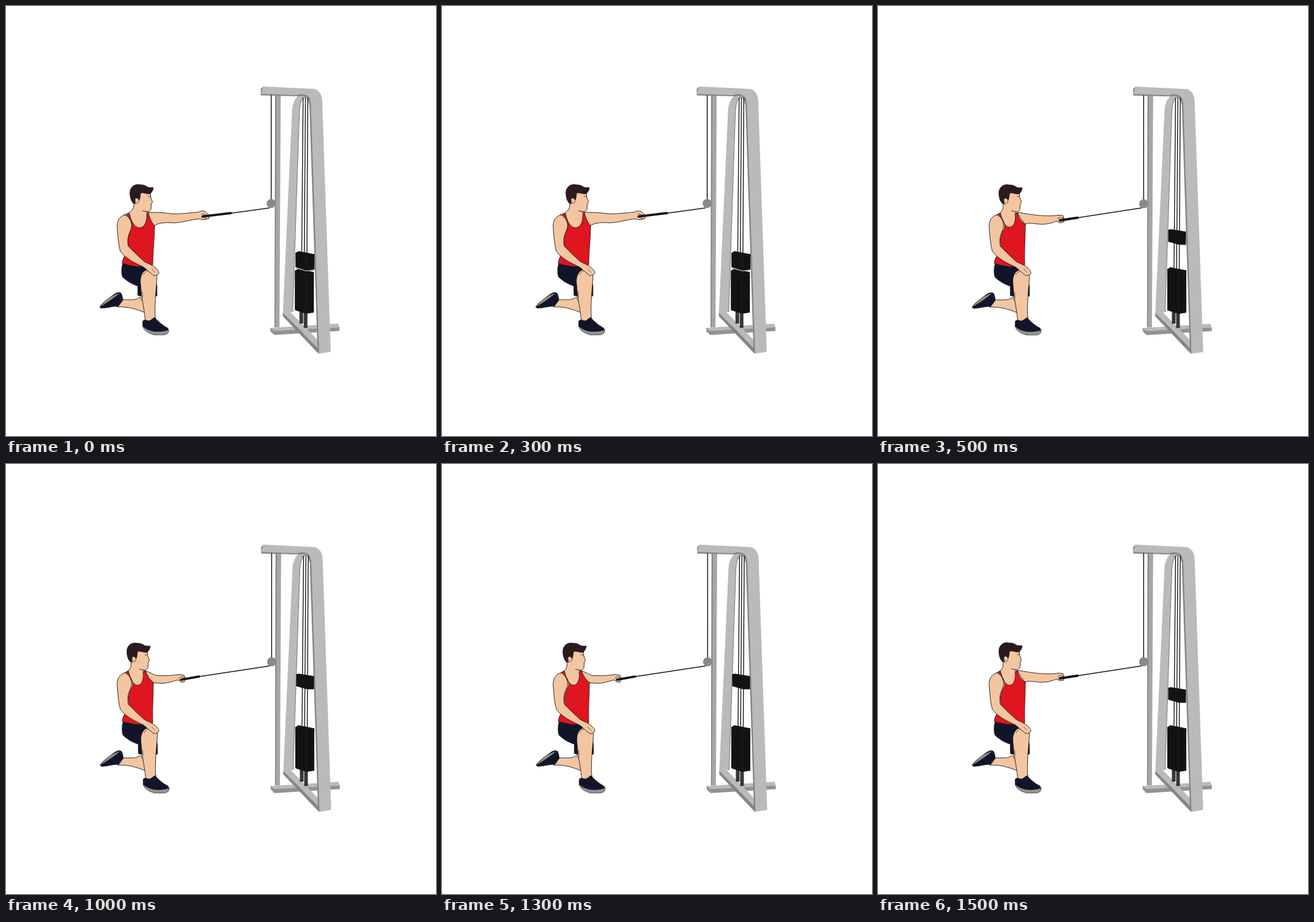
Animation of 700x700 px, one loop 2000 ms. Source, as an HTML page with a canvas:

```html
<!DOCTYPE html>
<html lang="en">
<head>
<meta charset="utf-8">
<title>Half-kneeling cable press</title>
<style>
  html, body { margin: 0; width: 100%; height: 100%; overflow: hidden; background: #fff; }
  canvas { display: block; width: 700px; height: 700px; }
</style>
</head>
<body>
<canvas id="stage" width="700" height="700"></canvas>
<script>
const ctx = document.getElementById('stage').getContext('2d');
const STEP = 500;
const SKIN = '#f3c6a1', NAVY = '#11152a', HAIR = '#2b1a1e', RED = '#df1520', INK = '#1c1717';
const LIGHT = '#bababa', MID = '#a6a6a6', DARK = '#858585', BLACK = '#131313';

function shape(d, fill, line, width = 0.9) {
  const path = new Path2D(d);
  if (fill) { ctx.fillStyle = fill; ctx.fill(path); }
  if (line) { ctx.strokeStyle = line; ctx.lineWidth = width; ctx.stroke(path); }
}
const stroke = (d, width = 1.2, color = INK) => shape(d, null, color, width);

function shifted(x, y, draw) {
  ctx.save();
  ctx.translate(x, y);
  draw();
  ctx.restore();
}

const extended = {
  machine: [-0.3, -0.1], head: [0, 0], plate: null,
  chest: 'M208 320C209 331 204 336 192 340L200 367L238 366L242 358C238 347 234 339 232 336C227 336 226 335 226 331Z',
  tank: 'M196 340L201 337.500C203 349 209 361 217 361C226 361 230 350 229 338L232 336C233 346 238 353 242 358C242 375 239 400 239 421C222 427 205 424 189 419C190 409 199 398 199 389C197 378 200 371 203 365C207 357 205 347 196 340Z',
  arm: 'M231 336C244 336 258 336 272 338.500C288 338 301 337 313 335.500C318 333 323 333 326 336L331 341L330.500 346L322 348L314 346.500C300 348 286 353 272 353C258 352 248 353 241 358C237 353 234 346 231 336Z',
  hand: 'M318 338L325 340L331 341M320 344L327 346',
  grip: [320, 342.6, 367, 337.2]
};
const bent = {
  machine: [0.4, 0.2], head: [-5, 0.2], plate: 363,
  chest: 'M203 321C205 331 202 336 193 340L201 367L236 365L240 356C237 347 231 340 228 337C222 336 221 335 221 331Z',
  tank: 'M195 339L199.500 337C202 349 207 360 214 360C221 360 225 350 223 338L227 337C229 346 234 353 240 355C240 374 238 399 239 421C222 427 205 424 189 419C190 409 200 398 200 389C198 378 201 370 205 364C209 357 204 346 195 339Z',
  arm: 'M227 336C237 337 244 339 258 340.500C272 342 285 342 293 340.500L301 341L303 347L302 352L296 353L291 350C282 354 272 356 262 355C252 354 244 353 239 355C236 350 230 344 227 336Z',
  hand: 'M292 346L297 344L303 346',
  grip: [296, 349, 326, 344.6]
};
const pulled = {
  ...bent, head: [-5, 0.8], plate: 341,
  arm: 'M227 337C236 339 240 344 247 344.500C261 345 274 344 283 342.500L290 344L291.500 349L290 355L285 355L280 351.500C270 354 260 358 250 357C246 356 242 356 239 357C236 352 230 345 227 337Z',
  hand: 'M281 349L286 346L291 348',
  grip: [285, 351.2, 315, 346]
};
const poses = [extended, bent, pulled, bent];

function drawFrame() {
  // base
  shape('M430 524L541 517L543 523L437 530Z', LIGHT);
  shape('M430 524L437 529L543 523V529L437 535.500L431 530Z', '#929292');
  shape('M451 499L462 497L510 546V559Z', LIGHT);
  shape('M451 499L509 558V566L451 505Z', DARK);
  // column
  shape('M438.500 144H447.500L445.500 523H437.500Z', MID);
  shape('M438.500 144H440.500L439 523H437.500Z', DARK);
  // far leg and arch
  shape('M451 500L466 170C467 154 474 144 485 143C493 143 497 149 498 158L493 160C491 151 489 149 487 149C481 150 479 158 478 170L467 498Z', LIGHT);
  stroke('M467 498L478 170C479 157 482 149 488 148.500', 1.2, DARK);
  // top beam and near leg
  shape('M419 131L502 135C508 136 514 142 515 152L529 563L509 566L496 155C495 149 490 145 483 145L415 144Z', LIGHT);
  shape('M419 131L415 144L415 135Z', DARK);
  shape('M415 143L474 145C482 142 492 143 496 153L494 157C491 148 487 145 477 147L415 145.500Z', DARK);
  shape('M494 155L496.500 156L510 566L507.500 562Z', DARK);
}

function drawCables(to) {
  for (const [top, bottom] of [[484, 481.5], [487.8, 485.7], [491.6, 490]]) {
    const end = top + (bottom - top) * (to - 149) / 280;
    stroke(`M${top} 149L${end} ${to}`, 1.4);
  }
}

function slab(x, y, h) {
  shape(`M${x} ${y + 3}L${x + 5} ${y}L${x + 31} ${y + 5}V${y + h - 2}L${x + 18} ${y + h}L${x} ${y + h - 6}Z`, BLACK);
  stroke(`M${x + 18} ${y + 6}V${y + h}`, 0.7, '#2b2b2b');
}

function drawStack(plate) {
  shape('M478 494H484V517H478ZM485 498H491V524H485Z', '#363636');
  drawCables(plate ? 428 : 402);
  if (plate) {
    slab(470.5, 425, 76);
    shape(`M472 ${plate + 1}L476 ${plate}L501 ${plate + 4}V${plate + 25.5}L490 ${plate + 25.5}L472 ${plate + 20.5}Z`, BLACK);
  } else {
    slab(470.5, 428, 73);
    slab(471.5, 399, 32);
    stroke('M472 426.500L489 431.500L502 430', 1.3, '#a0a0a0');
  }
}

function drawMachine(plate) {
  drawFrame();
  drawStack(plate);
  stroke('M432 145V318', 1.5);
  ctx.fillStyle = '#898989';
  ctx.beginPath();
  ctx.arc(432, 321.7, 7.4, 0, 2 * Math.PI);
  ctx.fill();
}

function drawLegs() {
  // trailing leg
  shape('M181 490L190 478C201 478 211 480 219 474L227 489L226 499C211 493 198 489 181 490Z', SKIN, INK);
  shape('M153 490C157 483 166 478 173 472C179 467 184 465 188 468L190 475L190.500 479L183 489C176 488 165 492 155 492Z', NAVY, INK);
  shape('M153 490C161 480 173 470 186 467C178 474 167 482 155 489Z', '#929292', INK, 0.6);
  // shorts
  shape('M191 418C188 425 188 435 190 441C198 449 207 453 215 456V471C223 474 237 474 246 472L246 456L238 422Z', NAVY, INK);
  // leading leg
  shape('M219 449C219 437 224 430 232 429C241 428 247 434 246 443C245 456 244 467 243.500 476C243 490 242 499 244 510L227 514C226 498 223 484 221 472Z', SKIN, INK);
  stroke('M224 438C226 433 230 431 235 431M222 465L223 475', 0.6);
  shape('M223 513C226 510 229 512 234 513L242 507C249 515 257 521 263 524C266 527 265 531 260 532L240 533L223 522Z', NAVY, INK);
  shape('M223 521C231 529 244 533 265 527.500C266 531 263 535 257 535.500L241 535.500C231 532 224 528 223 521Z', '#929292', INK, 0.6);
}

function drawTorso(pose) {
  shape(pose.chest, SKIN, INK);
  shape(pose.arm, SKIN, INK);
  stroke(pose.hand, 0.7);
  shape(pose.tank, RED, INK, 0.8);
}

function drawNearArm() {
  shape('M194 340C184 342 180 352 181 361C182 374 183 388 186 399C194 411 211 419 222 424C228 427 231 432 237 436C240 440 245 439 247 437C251 435 248 430 243 426C238 421 230 419 225 416C216 408 207 399 199 391C197 381 199 373 202 367C207 357 204 346 194 340Z', SKIN, INK);
  stroke('M237 428L243 434', 0.6);
}

function drawHead() {
  shape('M207 313C207 302 218 296 234 300L235 309L238.500 319L236.500 322L236 330C235 335 229 335 223 333L211 322Z', SKIN);
  stroke('M235.500 304L235.500 311L238.500 319L236.500 322L236 331C234 336 228 335 222 333', 0.9);
  shape('M207 321C203 317 201 308 202 301C204 293 211 289 219 291C225 291 228 293 231 295C235 296 238 295 240 296C239 301 237 304 234 306C229 306 225 304 220 304C218 307 219 312 217 316L214 313C209 313 209 319 211 322Z', HAIR, INK, 0.7);
  shape('M210 315C210 312 214 312 216 315C217 318 216 321 214 321C212 321 210 318 210 315Z', SKIN, INK, 0.7);
  stroke('M231 310L235 310', 0.7);
}

function drawGrip([x0, y0, x1, y1]) {
  stroke(`M${x1} ${y1}L429 328.800`, 1.5);
  ctx.lineCap = 'round';
  stroke(`M${x0} ${y0}L${x1 - 1} ${y1}`, 3.8, BLACK);
  ctx.lineCap = 'butt';
}

function draw(pose) {
  ctx.fillStyle = '#fff';
  ctx.fillRect(0, 0, 700, 700);
  ctx.lineJoin = 'round';
  shifted(...pose.machine, () => {
    drawMachine(pose.plate);
    drawLegs();
  });
  drawTorso(pose);
  drawNearArm();
  shifted(...pose.head, drawHead);
  drawGrip(pose.grip);
}

function tick() {
  draw(poses[Math.floor(performance.now() / STEP) % poses.length]);
  requestAnimationFrame(tick);
}
tick();
</script>
</body>
</html>
```
